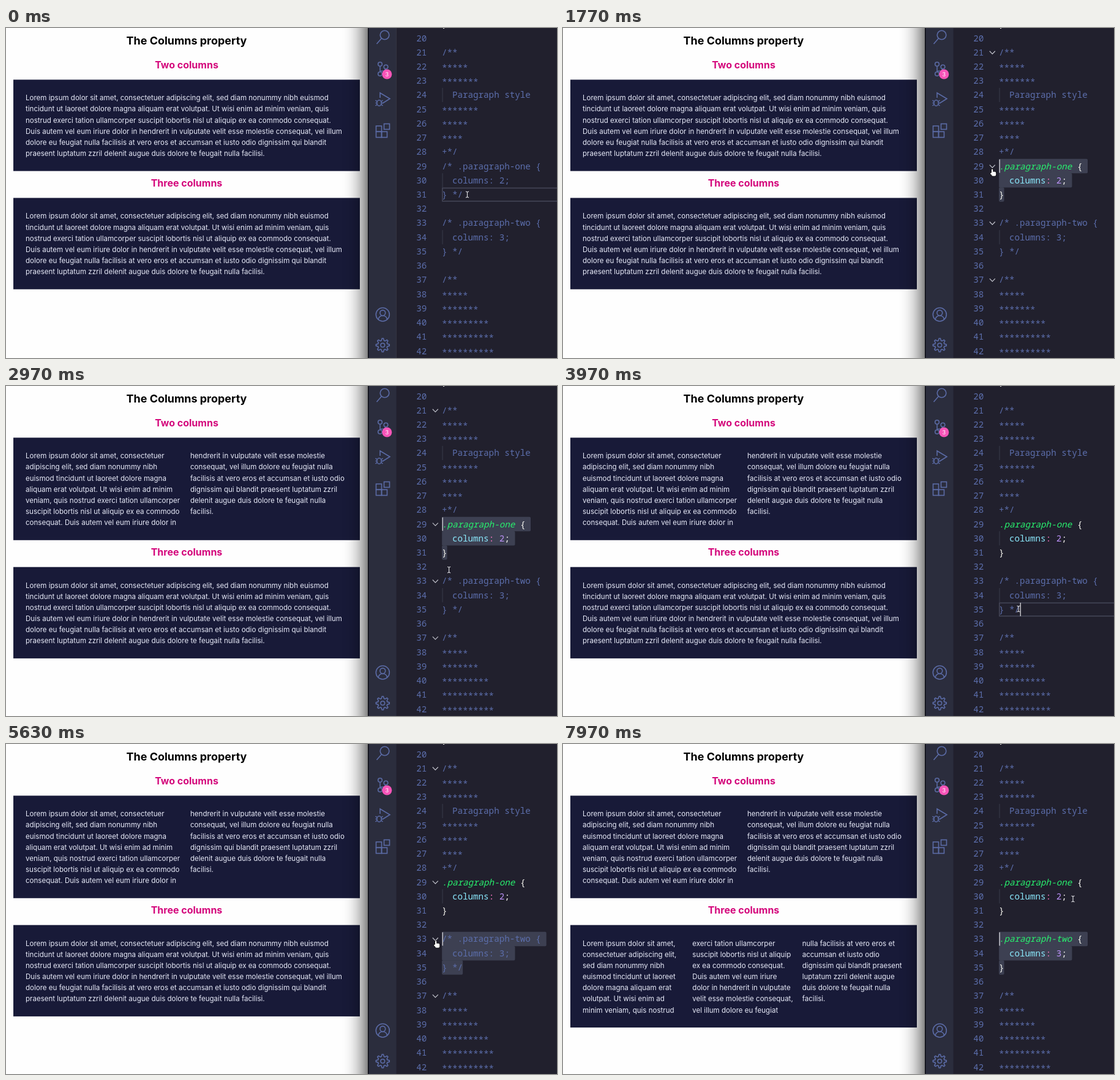
An HTML page with a canvas for the animation above (8 s loop, 900x539 px).

```html
<!DOCTYPE html>
<html lang="en">
<head>
<meta charset="utf-8">
<title>The Columns property</title>
<style>
html, body { margin: 0; width: 100%; height: 100%; overflow: hidden; background: #fff; }
canvas { display: block; }
</style>
</head>
<body>
<canvas id="stage" width="900" height="539"></canvas>
<script>
const ctx = document.getElementById('stage').getContext('2d');
const LOOP = 8000;
const SANS = 'Inter, sans-serif';
const SERIF = '"Liberation Serif", serif';
const MONO = '14.2px "Noto Sans Mono", monospace';
const BODY = '11.56px ' + SANS;
const PLAIN_BODY = '10.75px ' + SERIF;

// Editor metrics
const CODE_X = 712, CHAR = 8.53, ROW = 23.23;
const rowY = n => 16.5 + (n - 20) * ROW;

const COLOR = {
  comment: '#5c6eac', name: '#28f26f', prop: '#8be9fd', colon: '#ff79c6',
  number: '#bd93f9', plain: '#f8f8f2', icon: '#5b6ba6'
};

// Moments at which something changes at once
const AT = {
  dragOne: 150, selectedOne: 700, uncommentOne: 1720, reload: 2420, twoColumns: 2470,
  click: 3950, dragTwo: 4250, selectedTwo: 4500, uncommentTwo: 5720, threeColumns: 6670
};
const BLINK_STARTS = [-600, AT.dragOne, AT.selectedOne, AT.uncommentOne,
  AT.click, AT.dragTwo, AT.selectedTwo, AT.uncommentTwo];

const MOVES = [
  { from: 150, to: 830, x: 703, y: 236 },
  { from: 2600, to: 3340, x: 744, y: 364 },
  { from: 4250, to: 4600, x: 705, y: 334 },
  { from: 4600, to: 5000, x: 704, y: 327 },
  { from: 6850, to: 7800, x: 833, y: 253 }
];

const LOREM = 'Lorem ipsum dolor sit amet, consectetuer adipiscing elit, sed diam nonummy nibh euismod ' +
  'tincidunt ut laoreet dolore magna aliquam erat volutpat. Ut wisi enim ad minim veniam, quis ' +
  'nostrud exerci tation ullamcorper suscipit lobortis nisl ut aliquip ex ea commodo consequat. ' +
  'Duis autem vel eum iriure dolor in hendrerit in vulputate velit esse molestie consequat, vel illum ' +
  'dolore eu feugiat nulla facilisis at vero eros et accumsan et iusto odio dignissim qui blandit ' +
  'praesent luptatum zzril delenit augue duis dolore te feugait nulla facilisi.';

const clamp = (v, low = 0, high = 1) => Math.min(high, Math.max(low, v));
const ramp = (t, from, to) => clamp((t - from) / (to - from));
const smooth = k => k * k * (3 - 2 * k);

function pointer(t) {
  let x = 753.5, y = 272;
  for (const m of MOVES) {
    const k = smooth(ramp(t, m.from, m.to));
    x += (m.x - x) * k;
    y += (m.y - y) * k;
  }
  return [x, y];
}

function wrap(str, font, width) {
  ctx.font = font;
  const lines = [];
  for (const word of str.split(' ')) {
    const last = lines.length - 1;
    const longer = lines[last] + ' ' + word;
    if (last >= 0 && ctx.measureText(longer).width <= width) lines[last] = longer;
    else lines.push(word);
  }
  return lines;
}

const PLAIN_LINES = wrap(LOREM, PLAIN_BODY, 583);
const COLUMN_LINES = [1, 2, 3].map(n => wrap(LOREM, BODY, 532 / n - 11));

function text(str, x, y, font, color, align = 'left') {
  ctx.font = font;
  ctx.fillStyle = color;
  ctx.textAlign = align;
  ctx.fillText(str, x, y);
}

function line(points, close) {
  ctx.beginPath();
  points.forEach(([x, y]) => ctx.lineTo(x, y));
  if (close) ctx.closePath();
  ctx.stroke();
}

function ring(x, y, r) {
  ctx.beginPath();
  ctx.arc(x, y, r, 0, Math.PI * 2);
  ctx.stroke();
}

// ---- Web page ----

function plainPage() {
  text('The Columns property', 4, 31.2, 'bold 21.4px ' + SERIF, '#000');
  ['Two columns', 'Three columns'].forEach((title, i) => {
    const y = i * 110.7;
    text(title, 4, 67 + y, 'bold 16.05px ' + SERIF, '#000');
    PLAIN_LINES.forEach((str, n) => text(str, 4, 95.2 + y + n * 12.9, PLAIN_BODY, '#000'));
  });
}

// Draws one titled box and returns its height
function section(title, top, columns) {
  const lines = COLUMN_LINES[columns - 1];
  const rows = Math.ceil(lines.length / columns);
  const height = 40.2 + rows * 18.17;
  text(title, 295, top - 18.3, 'bold 16px ' + SANS, '#d4087c', 'center');
  ctx.fillStyle = '#181a38';
  ctx.fillRect(12, top, 566, height);
  lines.forEach((str, i) => {
    const x = 32 + Math.floor(i / rows) * 538 / columns;
    text(str, x, top + 33.9 + (i % rows) * 18.17, BODY, '#e8ebf9');
  });
  return height;
}

function page(t) {
  ctx.fillStyle = '#fefefe';
  ctx.fillRect(0, 0, 592, 539);
  if (t >= AT.reload && t < AT.twoColumns) {
    plainPage();
  } else {
    text('The Columns property', 295, 26.6, 'bold 17.95px ' + SANS, '#000', 'center');
    const h = section('Two columns', 84.4, t < AT.twoColumns ? 1 : 2);
    section('Three columns', 84.4 + h + 43.9, t < AT.threeColumns ? 1 : 3);
  }
  for (let x = 545; x < 591; x++) {
    ctx.fillStyle = `rgba(0,0,0,${0.5 * ramp(x, 545, 591) ** 2.2})`;
    ctx.fillRect(x, 0, 1, 539);
  }
}

// ---- Activity bar ----

function gear(x, y) {
  const points = Array.from({ length: 32 }, (_, i) => {
    const r = i % 4 < 2 ? 11 : 7.8;
    const a = (i - 0.5) * Math.PI / 16;
    return [x + r * Math.cos(a), y + r * Math.sin(a)];
  });
  line(points, true);
  ring(x, y, 3.3);
}

function branches() {
  ring(611, 59, 3.3);
  ring(611, 75, 3.3);
  ring(620.5, 63.5, 3.3);
  line([[611, 62.5], [611, 71.5]]);
  line([[620, 67], [618, 70], [611, 70.5]]);
  ctx.fillStyle = '#f754b8';
  ctx.beginPath();
  ctx.arc(622.3, 75.5, 8, 0, Math.PI * 2);
  ctx.fill();
  text('3', 622.3, 79, '9px ' + SANS, '#fff', 'center');
}

function debug() {
  line([[611, 114], [611, 106], [627, 115.5], [615, 123]]);
  const x = 609.5, y = 122.5;
  ctx.beginPath();
  ctx.ellipse(x, y, 3.6, 4.8, 0, 0, Math.PI * 2);
  ctx.stroke();
  for (const side of [-1, 1]) {
    for (const leg of [-1, 0, 1]) line([[x + side * 3.5, y + leg * 2.5], [x + side * 6, y + leg * 4.5]]);
  }
}

function activityBar() {
  ctx.fillStyle = '#0d0d14';
  ctx.fillRect(591, 0, 2, 539);
  ctx.fillStyle = '#2b2d3d';
  ctx.fillRect(592.5, 0, 45, 539);
  ctx.strokeStyle = COLOR.icon;
  ctx.lineWidth = 1.6;

  // Search
  ring(618.5, 11.5, 7.3);
  line([[613.3, 17], [605.5, 26]]);

  branches();
  debug();

  // Extensions
  ctx.strokeRect(604.5, 160, 9, 9.3);
  ctx.strokeRect(604.5, 169.3, 9, 9.3);
  ctx.strokeRect(613.5, 169.3, 9, 9.3);
  ctx.strokeRect(617.5, 156.5, 9, 9);

  // Account
  ring(615.3, 468, 11);
  ring(615.3, 465.3, 4.4);
  ctx.beginPath();
  ctx.arc(615.3, 477, 7.3, Math.PI * 1.03, Math.PI * 1.97);
  ctx.stroke();

  gear(615.3, 518);
}

// ---- Code ----

function rule(name, count, open) {
  if (!open) {
    return [`/* .${name} {`, `  columns: ${count};`, '} */'].map(s => [[s, COLOR.comment]]);
  }
  return [
    [['.' + name, COLOR.name, true], [' {', COLOR.plain]],
    [['  columns', COLOR.prop], [':', COLOR.colon], [' ' + count, COLOR.number], [';', COLOR.plain]],
    [['}', COLOR.plain]]
  ];
}

function codeLines(t) {
  const note = s => [[s, COLOR.comment]];
  const stars = n => note('*'.repeat(n));
  return [
    [['}', COLOR.plain]], note(''), note('/**'), stars(5), stars(7), note('  Paragraph style'),
    stars(7), stars(5), stars(4), note('+*/'),
    ...rule('paragraph-one', 2, t >= AT.uncommentOne), note(''),
    ...rule('paragraph-two', 3, t >= AT.uncommentTwo), note(''),
    note('/**'), ...[5, 7, 9, 10, 10].map(stars)
  ];
}

// Each rule is selected by dragging from its last line up to its first
function selection(t, x, y) {
  const second = t >= AT.click;
  const top = second ? 33 : 29;
  const anchor = { row: top + 2, col: 4 };
  if (t < (second ? AT.dragTwo : AT.dragOne)) return { anchor, head: anchor };
  if (t >= (second ? AT.selectedTwo : AT.selectedOne)) return { anchor, head: { row: top, col: 0 } };
  const head = {
    row: clamp(Math.round(20 + (y - 16.5) / ROW), top, top + 2),
    col: Math.max(0, Math.round((x - CODE_X) / CHAR))
  };
  return { anchor, head };
}

function drawSelection({ anchor, head }, length) {
  ctx.fillStyle = '#3d4052';
  for (let row = head.row; row <= anchor.row; row++) {
    const a = row === head.row ? Math.min(head.col, length(row)) : 0;
    const b = row === anchor.row ? Math.min(anchor.col, length(row)) : length(row) + 1;
    ctx.beginPath();
    ctx.roundRect(CODE_X + Math.min(a, b) * CHAR, rowY(row) - 11.8, Math.abs(b - a) * CHAR, ROW + 0.3, 2);
    ctx.fill();
  }
}

function drawCode(lines) {
  lines.forEach((tokens, i) => {
    const row = 19 + i;
    const base = rowY(row) + 5;
    if (row > 19) text(String(row), 687.3, base, MONO, COLOR.comment, 'right');
    let col = 0;
    for (const [str, color, slanted] of tokens) {
      const drop = /^\*+$/.test(str) ? 2 : 0;
      text(str, CODE_X + col * CHAR, base + drop, (slanted ? 'italic ' : '') + MONO, color);
      col += str.length;
    }
  });
}

function foldMarks(t) {
  const shown = (from, to) => ramp(t, from, from + 400) - ramp(t, to, to + 400);
  ctx.globalAlpha = shown(700, 2950) + shown(4400, 7000);
  ctx.strokeStyle = '#c3c4cd';
  ctx.lineWidth = 1.2;
  for (const row of [21, 29, 33, 37]) {
    const y = rowY(row) + 0.4;
    line([[696.8, y - 2.4], [701.3, y + 2.2], [705.8, y - 2.4]]);
  }
  ctx.globalAlpha = 1;
}

function editor(t, x, y) {
  ctx.fillStyle = '#21202d';
  ctx.fillRect(637.5, 0, 263, 539);
  const lines = codeLines(t);
  const length = row => lines[row - 19].reduce((n, [s]) => n + s.length, 0);
  const sel = selection(t, x, y);
  const { anchor, head } = sel;

  if (anchor === head) {
    ctx.strokeStyle = '#434556';
    ctx.lineWidth = 1.6;
    ctx.strokeRect(CODE_X + 0.8, rowY(head.row) - 10.6, 200, 21.4);
  } else {
    drawSelection(sel, length);
  }

  ctx.fillStyle = '#3b3d4d';
  for (const row of [24, 30, 34]) ctx.fillRect(712.5, rowY(row) - 11.6, 1, ROW);
  drawCode(lines);
  foldMarks(t);

  const since = t - BLINK_STARTS.filter(s => s <= t).pop();
  if (since % 1000 < 500) {
    ctx.fillStyle = '#d6d6da';
    ctx.fillRect(CODE_X + 0.5 + Math.min(head.col, length(head.row)) * CHAR, rowY(head.row) - 11, 1.3, 22);
  }
}

// ---- Pointer ----

function hand(x, y) {
  ctx.beginPath();
  ctx.roundRect(x - 3, y - 5.5, 2.2, 8, 1);
  ctx.roundRect(x - 3, y - 1.2, 7.2, 7, 2);
  ctx.roundRect(x - 4.8, y + 0.4, 3, 3, 1.4);
  ctx.strokeStyle = '#111';
  ctx.lineWidth = 1.6;
  ctx.stroke();
  ctx.fillStyle = '#fff';
  ctx.fill();
}

function beam(x, y) {
  ctx.strokeStyle = '#e4e4e8';
  ctx.lineWidth = 1.1;
  line([[x, y - 4], [x, y + 4]]);
  for (const s of [-1, 1]) line([[x - 2.5, y + s * 5], [x, y + s * 4], [x + 2.5, y + s * 5]]);
}

function frame(now) {
  const t = now % LOOP;
  const [x, y] = pointer(t);
  page(t);
  editor(t, x, y);
  activityBar();
  (x < CODE_X ? hand : beam)(x, y);
  requestAnimationFrame(() => frame(performance.now() - start));
}

const start = performance.now();
frame(0);
</script>
</body>
</html>
```
